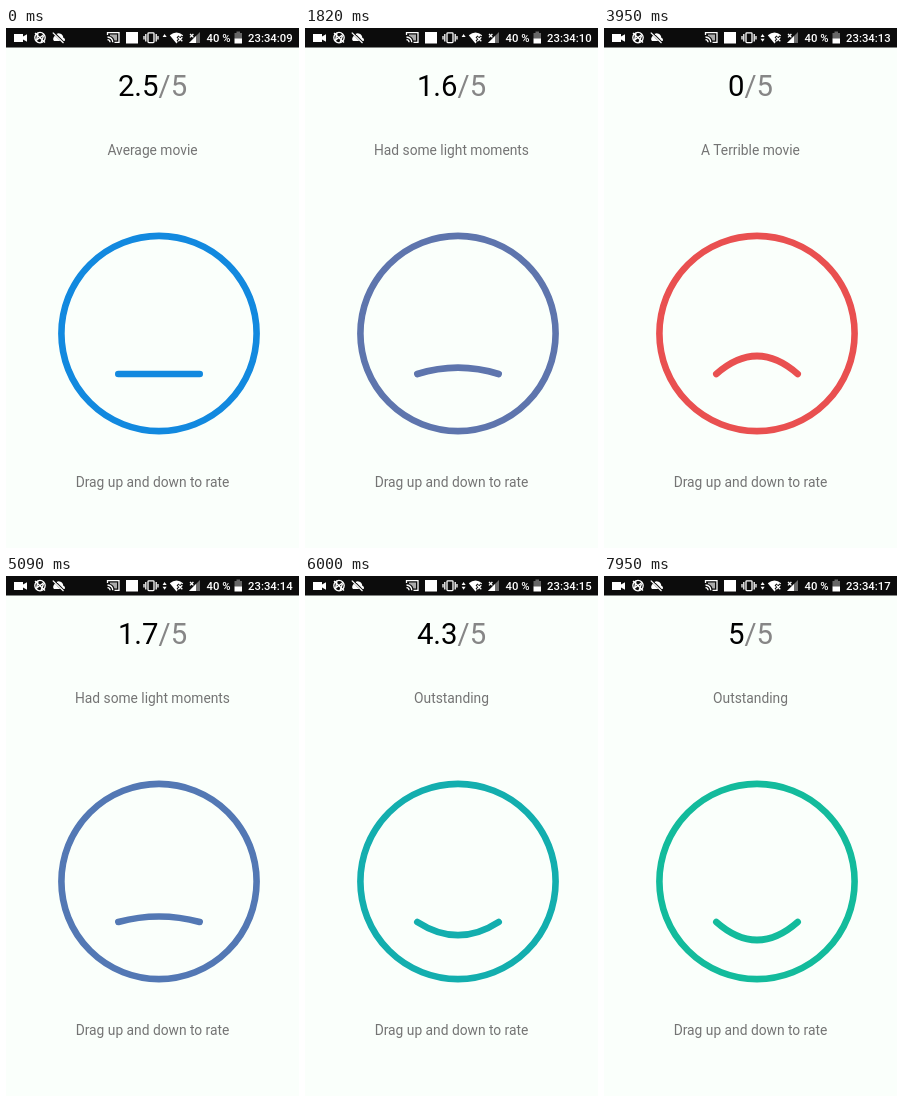
Recreate the animation shown at these times as an HTML page. Size 293x520 px, loop 8000 ms.

```html
<!DOCTYPE html>
<html lang="en">
<head>
<meta charset="utf-8">
<title>Movie rating</title>
<style>
  html, body { margin: 0; width: 100%; height: 100%; overflow: hidden; background: #fafffb; }
  svg { display: block; width: 293px; height: 520px; font-family: Roboto, sans-serif; }
  .label { font-size: 13.8px; fill: #747474; text-anchor: middle; }
  .status { font-size: 11.3px; font-weight: 500; fill: #fff; }
  .line { fill: none; stroke: #fff; stroke-width: 1.3; }
</style>
</head>
<body>
<svg viewBox="0 0 293 520">
  <rect width="293" height="520" fill="#fafffb"/>
  <rect width="293" height="19.5" fill="#0c0c0c"/>

  <g fill="#fff">
    <!-- camera, blocked ball, muted bell -->
    <path d="M8 6h9v2.5l4-2.3v7.6l-4-2.3v2.5h-9z"/>
    <circle cx="34" cy="9.6" r="5.2" class="line"/>
    <path d="M29 5l10 9.5M30 12.5l8-6M32 4.8l-1.5 8M37.5 8l-2.5 6.5" class="line"/>
    <path d="M48 13q-1.8-2 .2-4.5q2-3.8 5.5-3q3.4 .8 3.6 4.3q2.4 .8 1.4 3.2z"/>
    <path d="M47.5 4.5l10.5 10.5" stroke="#0c0c0c" stroke-width="2.4"/>
    <path d="M46.8 4.6l10.7 10.4" class="line"/>

    <!-- screen cast -->
    <path d="M101.5 7v-2.3h11.5v9.6h-4.5M101.5 9q5 .3 5.3 5.3M101.5 11.7q2.5 .2 2.6 2.6" class="line"/>
    <path d="M104 6.5h7v6h-2.5q-1-3.7-4.5-4.5z" opacity=".65"/>
    <rect x="120" y="4" width="12" height="11.5"/>

    <!-- vibrate -->
    <rect x="142" y="4.8" width="6" height="9.8" rx=".8" class="line"/>
    <path d="M139.8 6v7.5M150.2 6v7.5M138 8v3.5M152 8v3.5" class="line"/>

    <path d="M156.6 9l2-3 2 3z"/>
    <path id="down" d="M156.6 10.8h4l-2 3z"/>

    <!-- wifi, signal -->
    <path d="M163.8 7.2q6.7-5.4 13.4 0l-6.7 8.2z"/>
    <path d="M171.5 8.5l5 5M176.5 8.5l-5 5" stroke="#0c0c0c" stroke-width="2.6"/>
    <path d="M172.3 9.3l4 4M176.3 9.3l-4 4" class="line"/>
    <path d="M183 15l11-11v11z" opacity=".4"/>
    <path d="M183 15l7-7v7z"/>
    <path d="M184 6l3.4 3.4M187.4 6l-3.4 3.4" class="line"/>

    <!-- battery -->
    <path d="M228.5 5h2v-1.5h3.5v1.5h2v5.4h-7.5z" fill="#666"/>
    <path d="M228.5 10.4h7.5v5.1h-7.5z"/>
  </g>
  <text class="status" x="200.5" y="14">40 %</text>
  <text class="status" id="clock" x="286.6" y="14" text-anchor="end"></text>

  <text x="146.5" y="68" font-size="29.3" text-anchor="middle"><tspan id="score"></tspan><tspan fill="#868686">/5</tspan></text>
  <text class="label" id="verdict" x="146.5" y="127"></text>
  <g id="face" fill="none" stroke-width="6.6" stroke-linecap="round">
    <circle cx="153" cy="305.5" r="97.6"/>
    <path id="mouth"/>
  </g>
  <text class="label" x="146.5" y="459">Drag up and down to rate</text>
</svg>
<script>
const LOOP = 8000;
const RED = [233, 80, 80], BLUE = [18, 137, 223], GREEN = [19, 187, 156];
const VERDICTS = ['A Terrible movie', 'Had some light moments', 'Average movie', 'A Good movie', 'Outstanding'];
// [time in ms, rating]
const DRAG = [[0, 2.5], [1190, 2.5], [1820, 1.62], [2500, 0.72], [2890, 0],
  [4640, 0], [5090, 1.74], [6000, 4.33], [6350, 5], [LOOP, 5]];

const $ = id => document.getElementById(id);
const lerp = (a, b, k) => a + (b - a) * k;
const mix = (a, b, k) => `rgb(${a.map((c, i) => Math.round(lerp(c, b[i], k)))})`;

function ratingAt(t) {
  const i = DRAG.findIndex(([time]) => time > t);
  const [t0, r0] = DRAG[i - 1], [t1, r1] = DRAG[i];
  return lerp(r0, r1, (t - t0) / (t1 - t0));
}

function draw(t) {
  const rating = ratingAt(t);
  const mood = rating / 2.5 - 1;
  const second = 9 + Math.floor((t + 50) / 1000);

  $('clock').textContent = '23:34:' + String(second).padStart(2, '0');
  $('down').style.display = t < 1950 ? 'none' : '';
  $('score').textContent = +rating.toFixed(1);
  $('verdict').textContent = VERDICTS[Math.min(4, Math.floor(rating))];
  $('face').setAttribute('stroke', mix(BLUE, mood < 0 ? RED : GREEN, Math.abs(mood)));
  $('mouth').setAttribute('d', `M112.3 346Q153 ${346 + 36 * mood} 193.7 346`);
}

const start = performance.now();
function tick() {
  draw((performance.now() - start) % LOOP);
  requestAnimationFrame(tick);
}
tick();
</script>
</body>
</html>
```
